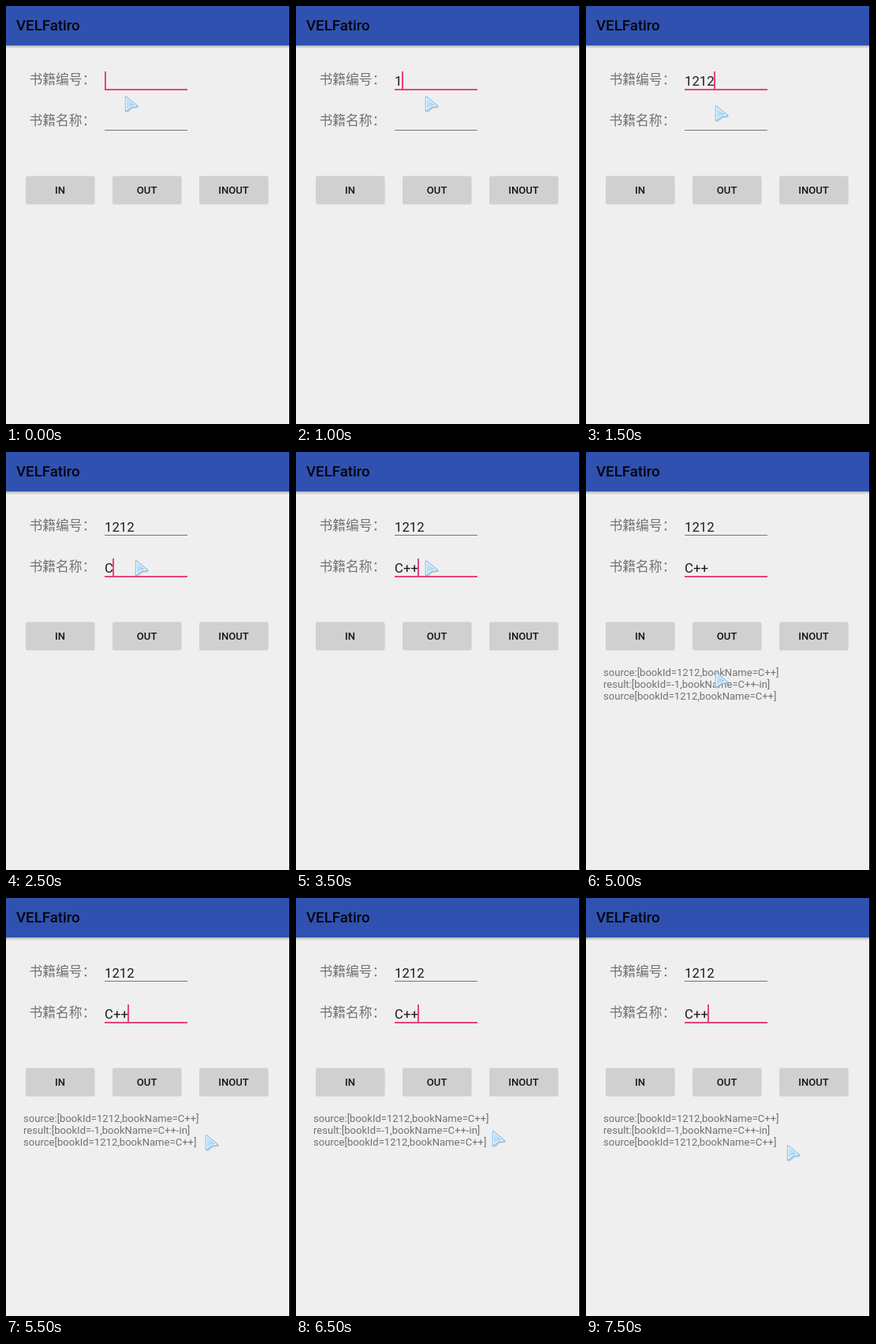
An HTML page that plays this animation: 360 px wide and 530 px high, repeating every 8000 ms.

```html
<!DOCTYPE html>
<html lang="zh-CN">
<head>
<meta charset="utf-8">
<title>Book form</title>
<style>
  html, body { margin: 0; width: 100%; height: 100%; overflow: hidden; background: #efefef; }
  svg { display: block; width: 360px; height: 530px; }
  text { font-family: Roboto, "Noto Sans CJK SC", "Noto Sans CJK", sans-serif; white-space: pre; }
  .title { font-size: 18.7px; font-weight: 500; fill: #05060c; }
  .label { font-family: "Noto Sans CJK SC", "Noto Sans CJK", sans-serif; font-size: 16.8px; fill: #727272; }
  .value { font-size: 16.8px; fill: #1c1c1c; }
  .button { font-size: 13.07px; font-weight: 500; fill: #151515; text-anchor: middle; }
  .result { font-size: 13.07px; fill: #727272; }
</style>
</head>
<body>
<svg id="stage" viewBox="0 0 360 530">
  <defs>
    <linearGradient id="shade" x1="0" y1="0" x2="0" y2="1">
      <stop offset="0" stop-color="#b4b4b4"/>
      <stop offset="1" stop-color="#efefef"/>
    </linearGradient>
    <linearGradient id="ice" x1="0" y1="0" x2="1" y2="0.6">
      <stop offset="0" stop-color="#d9effc"/>
      <stop offset="0.55" stop-color="#b0d9f5"/>
      <stop offset="1" stop-color="#79b4e4"/>
    </linearGradient>
  </defs>
  <rect width="360" height="530" fill="#efefef"/>
  <rect y="50" width="360" height="4" fill="url(#shade)"/>
  <rect width="360" height="50" fill="#3051b0"/>
  <text class="title" x="13" y="31">VELFatiro</text>
  <g id="form"></g>
  <g id="results"></g>
  <rect id="caret" width="2" height="22" fill="#ea417d"/>
  <rect x="359" width="1" height="530" fill="#000"/>
  <g id="pointer" stroke-linejoin="round">
    <path d="M3 3 L17 14 L10 15 L4 20 Z" fill="#8d9fae" stroke="#8d9fae" stroke-width="2" opacity=".4"/>
    <path d="M2 1.5 L16 13 L8.5 14 L2 19 Z" fill="url(#ice)" stroke="#8fc3ea" stroke-width="2.6"/>
    <path d="M2.3 2.5 L14.5 12.4 L8 13.2 L2.5 17.5 Z" fill="none" stroke="#f4fbff" stroke-width="1.1"/>
  </g>
</svg>
<script>
const STEP = 500;
const PINK = "#ea417d", GRAY = "#757575";
const byId = id => document.getElementById(id);

function add(parent, tag, attrs, text = "") {
  const node = document.createElementNS("http://www.w3.org/2000/svg", tag);
  for (const key in attrs) node.setAttribute(key, attrs[key]);
  node.textContent = text;
  parent.append(node);
  return node;
}

const form = byId("form");
const fields = ["书籍编号：", "书籍名称："].map((label, i) => {
  const top = 83 + i * 52;
  add(form, "text", { class: "label", x: 29.5, y: top + 16 }, label);
  return {
    top,
    line: add(form, "rect", { x: 125, y: top + 22, width: 105 }),
    value: add(form, "text", { class: "value", x: 125, y: top + 18 })
  };
});

["IN", "OUT", "INOUT"].forEach((name, i) => {
  const x = 25 + i * 110;
  add(form, "rect", { x, y: 216, width: 87.5, height: 36, rx: 2.5, fill: "#dedede" });
  add(form, "rect", { x, y: 215.5, width: 87.5, height: 35.5, rx: 2.5, fill: "#d0d0d0" });
  add(form, "text", { class: "button", x: x + 43.6, y: 238 }, name);
});

[
  "source:[bookId=1212,bookName=C++]",
  "result:[bookId=-1,bookName=C++-in]",
  "source[bookId=1212,bookName=C++]"
].forEach((line, i) =>
  add(byId("results"), "text", { class: "result", x: 22, y: 283.5 + i * 15.4 }, line));

// Each step: pointer x, pointer y, number, name, caret x (0 = hidden)
const steps = [
  [150, 114, "", "", 125],
  [163, 114, "", "", 0],
  [163, 114, "1", "", 134],
  [163, 126, "1212", "", 162],
  [163, 137, "1212", "", 125],
  [163, 137, "1212", "C", 135],
  [163, 137, "1212", "C+", 145],
  [163, 137, "1212", "C++", 154],
  [148, 170, "1212", "C++", 0],
  [86, 230, "1212", "C++", 154],
  [163, 279, "1212", "C++", 0],
  [252, 300, "1212", "C++", 154],
  [248, 295, "1212", "C++", 0],
  [248, 295, "1212", "C++", 154],
  [254, 313, "1212", "C++", 0],
  [254, 313, "1212", "C++", 154]
];
const FOCUS_STEP = 4, RESULT_STEP = 10;

function render(time) {
  const index = Math.floor(time / STEP) % steps.length;
  const [x, y, number, name, caretX] = steps[index];
  const focused = index < FOCUS_STEP ? 0 : 1;

  [number, name].forEach((text, i) => {
    const { line, value } = fields[i];
    value.textContent = text;
    line.setAttribute("height", i === focused ? 2 : 1);
    line.setAttribute("fill", i === focused ? PINK : GRAY);
  });

  const caret = byId("caret");
  caret.setAttribute("x", caretX);
  caret.setAttribute("y", fields[focused].top);
  caret.setAttribute("visibility", caretX ? "visible" : "hidden");
  byId("results").setAttribute("visibility", index >= RESULT_STEP ? "visible" : "hidden");
  byId("pointer").setAttribute("transform", `translate(${x} ${y})`);
}

const start = performance.now();
function tick() {
  render(performance.now() - start);
  requestAnimationFrame(tick);
}
tick();
</script>
</body>
</html>
```
